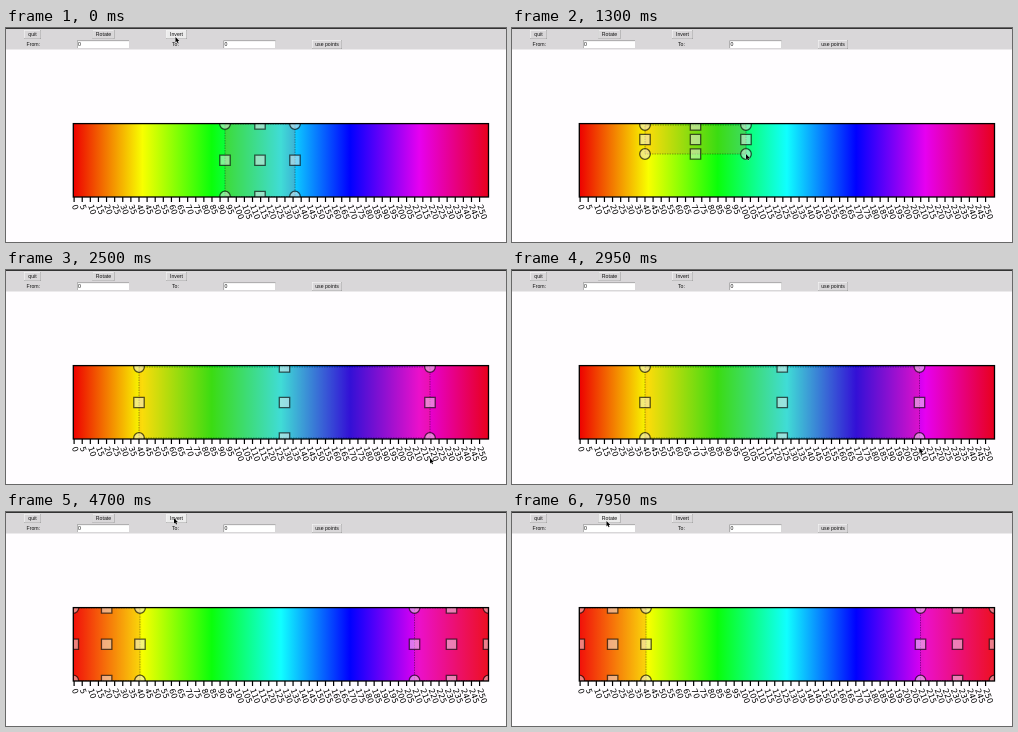
Write an HTML page with a canvas that moves like this. It is 500 px wide and 214 px high and loops after 8 s.

```html
<!DOCTYPE html>
<html lang="en">
<head>
<meta charset="utf-8">
<title>Hue range selector</title>
<style>
  html, body { margin: 0; width: 100%; height: 100%; overflow: hidden; background: #fffdff; }
  canvas { display: block; }
</style>
</head>
<body>
<canvas id="stage" width="500" height="214"></canvas>
<script>
const ctx = document.getElementById('stage').getContext('2d');
const LOOP = 8000, STEP = 50;
const BAR = { left: 67.3, top: 95.6, right: 482.5, bottom: 169 };
const PRESS = 550, RELEASE = 3300, INVERT = 4500;
const ANCHOR = { x: 133, y: 97 };

// Pointer path: time, x, y
const PATH = [
  [0, 169.5, 9], [100, 169.5, 9], [PRESS, ANCHOR.x, ANCHOR.y], [850, 180, 184],
  [950, 196, 200], [1300, 234, 126], [2050, 435, 156], [2350, 436, 203],
  [2600, 416, 178], [2950, 407.5, 178], [3450, 407.5, 178], [4200, 168, 2],
  [4350, 168, 1], [4550, 168, 6], [5300, 168, 7], [5900, 124, 31],
  [6250, 121, 31], [6550, 100, 7], [6700, 99, 8], [6900, 102, 19],
  [7650, 98, 14], [7850, 94.5, 9], [LOOP, 94.5, 9]
];

const BUTTONS = [
  { label: 'quit', x: 18, y: 2, w: 17 },
  { label: 'Rotate', x: 86.5, y: 2, w: 22 },
  { label: 'Invert', x: 160, y: 2, w: 21 },
  { label: 'use points', x: 306, y: 12, w: 30 }
];
const BUTTON_HEIGHT = 9;

function pointerAt(time) {
  const next = Math.max(1, PATH.findIndex(key => key[0] >= time));
  const [t0, x0, y0] = PATH[next - 1], [t1, x1, y1] = PATH[next];
  const p = (time - t0) / (t1 - t0);
  return { x: x0 + (x1 - x0) * p, y: y0 + (y1 - y0) * p };
}

function rect(x, y, w, h, color) {
  ctx.fillStyle = color;
  ctx.fillRect(x, y, w, h);
}

function text(label, x, y, align = 'left') {
  ctx.font = '5.2px "Liberation Sans", Arial, sans-serif';
  ctx.textAlign = align;
  ctx.textBaseline = 'middle';
  ctx.fillStyle = '#111';
  ctx.fillText(label, x, y);
}

function drawToolbar(pointer) {
  rect(0, 0, 500, 21.5, '#d9d7d9');
  rect(0, 0, 500, 1, '#333');
  for (const { label, x, y, w } of BUTTONS) {
    const hover = pointer.x >= x && pointer.x <= x + w &&
                  pointer.y >= y - 1 && pointer.y <= y + BUTTON_HEIGHT;
    rect(x, y, w, BUTTON_HEIGHT, '#999');
    rect(x, y, w - 0.7, BUTTON_HEIGHT - 0.7, '#f6f6f6');
    rect(x + 0.6, y + 0.6, w - 1.3, BUTTON_HEIGHT - 1.3, hover ? '#ececec' : '#d9d7d9');
    text(label, x + w / 2, y + BUTTON_HEIGHT / 2, 'center');
  }
  text('From:', 20.5, 16.5);
  text('To:', 166, 16.5);
  for (const x of [71, 217.5]) {
    rect(x, 12.5, 52, 7.5, '#888');
    rect(x + 0.6, 13.1, 51.4, 6.9, '#fff');
    text('0', x + 1, 16.5);
  }
}

function drawHues() {
  const hues = ctx.createLinearGradient(BAR.left, 0, BAR.right, 0);
  ['#ee0000', '#f8ff00', '#0aff0a', '#10ffff', '#0000ff', '#e600f0', '#e8001c']
    .forEach((color, i) => hues.addColorStop(i / 6, color));
  rect(BAR.left, BAR.top, BAR.right - BAR.left, BAR.bottom - BAR.top, hues);
}

function drawAxis() {
  ctx.strokeStyle = '#000';
  ctx.lineWidth = 1.3;
  ctx.strokeRect(BAR.left, BAR.top, BAR.right - BAR.left, BAR.bottom - BAR.top);
  ctx.font = '8px "DejaVu Sans", sans-serif';
  ctx.textAlign = 'left';
  ctx.textBaseline = 'middle';
  for (let value = 0; value <= 250; value += 5) {
    const x = BAR.left + (value + 0.5) * (BAR.right - BAR.left) / 256;
    rect(x - 0.6, BAR.bottom, 1.2, 5, '#000');
    ctx.save();
    ctx.translate(x - 0.5, 177);
    ctx.rotate(70 * Math.PI / 180);
    ctx.fillText(value, 0, 0);
    ctx.restore();
  }
}

function drawHandle(x, y, round) {
  ctx.beginPath();
  if (round) ctx.arc(x, y, 5.3, 0, Math.PI * 2);
  else ctx.rect(x - 5.2, y - 5.2, 10.4, 10.4);
  ctx.fill();
  ctx.stroke();
}

function drawSelection({ x0, y0, x1, y1 }) {
  ctx.save();
  ctx.beginPath();
  ctx.rect(BAR.left, BAR.top, BAR.right - BAR.left, BAR.bottom - BAR.top);
  ctx.clip();
  rect(x0, y0, x1 - x0, y1 - y0, 'rgba(255,80,50,.2)');
  ctx.lineWidth = 1;
  ctx.setLineDash([1.5, 1]);
  ctx.strokeStyle = 'rgba(0,0,0,.35)';
  ctx.strokeRect(x0, y0, x1 - x0, y1 - y0);
  ctx.setLineDash([]);
  ctx.lineWidth = 1.3;
  ctx.strokeStyle = 'rgba(0,0,0,.65)';
  ctx.fillStyle = 'rgba(240,235,240,.5)';
  const xs = [x0, (x0 + x1) / 2, x1], ys = [y0, (y0 + y1) / 2, y1];
  xs.forEach((x, i) => ys.forEach((y, j) => drawHandle(x, y, i !== 1 && j !== 1)));
  ctx.restore();
}

function selectionsAt(time) {
  const full = (x0, x1) => ({ x0, x1, y0: 96, y1: 168.5 });
  if (time < PRESS) return [full(219, 289)];
  if (time >= INVERT) return [full(BAR.left, 134), full(408.5, BAR.right)];
  const end = pointerAt(Math.min(time, RELEASE));
  return [{ x0: ANCHOR.x, y0: ANCHOR.y, x1: end.x, y1: Math.min(end.y, 168) }];
}

function drawPointer({ x, y }) {
  ctx.beginPath();
  [[0, 0], [0, 5.4], [1.2, 4.3], [2.1, 6.3], [3, 5.8], [2.2, 4], [3.8, 3.9]]
    .forEach(([dx, dy]) => ctx.lineTo(x + dx, y + dy));
  ctx.closePath();
  ctx.strokeStyle = 'rgba(255,255,255,.5)';
  ctx.lineWidth = 0.8;
  ctx.stroke();
  ctx.fillStyle = '#000';
  ctx.fill();
}

function draw(now) {
  const time = Math.floor(now % LOOP / STEP) * STEP;
  const pointer = pointerAt(time);
  rect(0, 0, 500, 214, '#fffdff');
  drawToolbar(pointer);
  drawHues();
  selectionsAt(time).forEach(drawSelection);
  drawAxis();
  drawPointer(pointer);
}

const start = performance.now();
function tick() {
  draw(performance.now() - start);
  requestAnimationFrame(tick);
}
tick();
</script>
</body>
</html>
```
